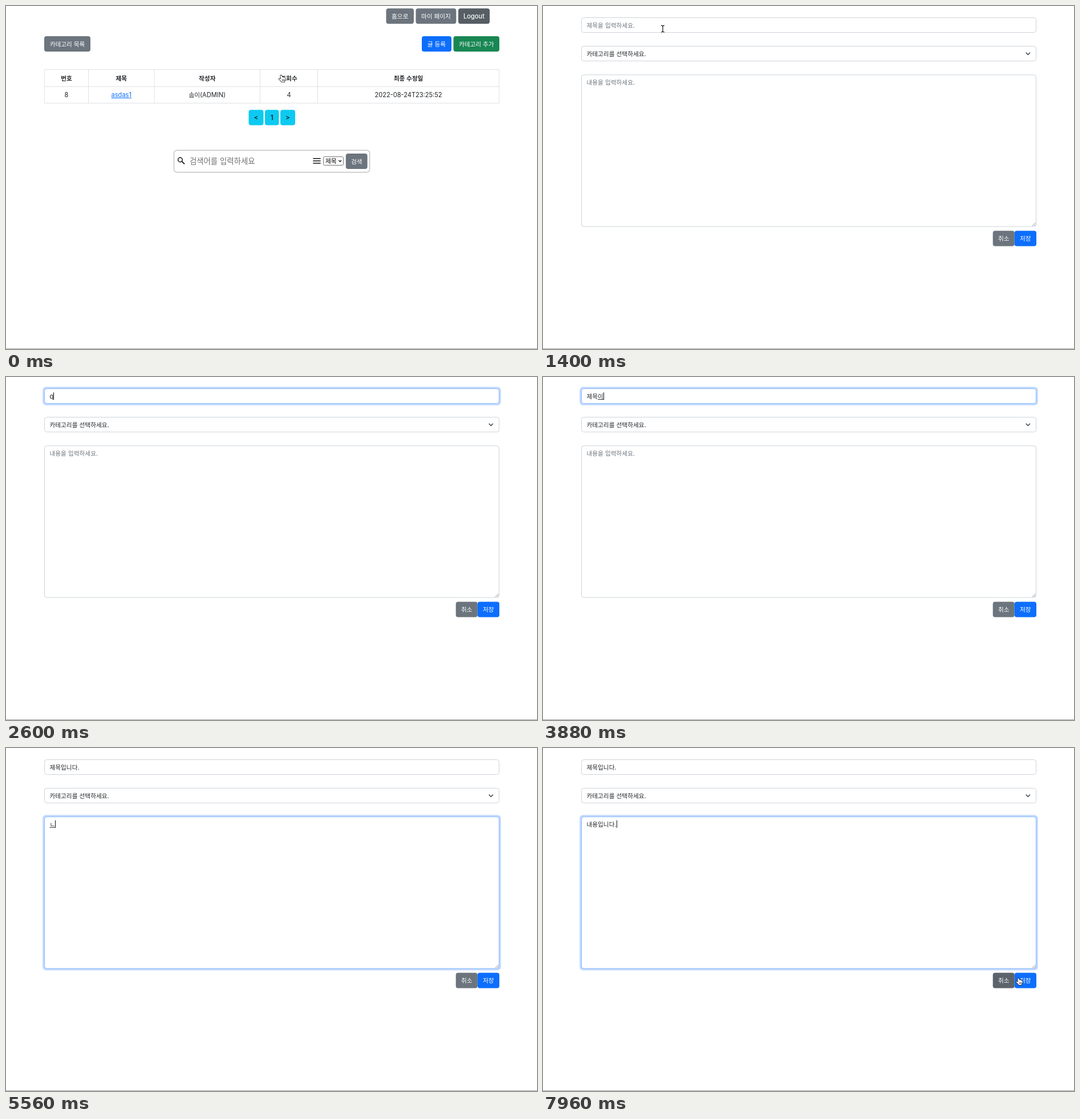
Write an HTML page with a canvas that moves like this. It is 931 px wide and 602 px high and loops after 8 s.

```html
<!DOCTYPE html>
<html lang="ko">
<head>
<meta charset="utf-8">
<title>게시판 글 등록</title>
<style>
html, body { margin: 0; width: 100%; height: 100%; overflow: hidden; background: #fff; }
canvas { display: block; }
</style>
</head>
<body>
<canvas id="stage" width="931" height="602"></canvas>
<script>
const ctx = document.getElementById('stage').getContext('2d');
const LOOP = 8000, STEP = 40;
const GRAY = '#6c757d', GRAY_DARK = '#5c636a', BLUE = '#0d6efd', INK = '#212529';
const FONT = 'Inter, "Noto Sans CJK KR", "Noto Sans CJK", sans-serif';
const HANGUL_FONT = '"Noto Sans CJK KR", "Noto Sans CJK", sans-serif';

// [time, x, y] of the pointer's hot spot
const PATH = [
  [0, 482.5, 122], [640, 757, 66.5], [880, 757, 66.5], [1400, 210, 40],
  [4720, 210, 40], [4960, 198, 162], [5120, 215, 200], [7160, 215, 200],
  [7560, 620, 400], [7760, 780, 426], [7960, 833.5, 404.5]
];

// [time, text, still composing]
const TITLE = [
  [0, ''], [2160, 'q'], [2280, ''], [2600, 'q'], [2720, ''],
  [3280, 'ㅈ', 1], [3360, '제', 1], [3440, '젬', 1], [3560, '제모', 1], [3640, '제목', 1],
  [3760, '제목ㅇ', 1], [3880, '제목이', 1], [4080, '제목입', 1], [4160, '제목입니', 1],
  [4240, '제목입니다', 1], [4440, '제목입니다.']
];
const BODY = [
  [0, ''], [5560, 'ㄴ', 1], [5760, '내', 1], [5960, '냉', 1], [6160, '내요', 1],
  [6240, '내용', 1], [6320, '내용ㅇ', 1], [6480, '내용이', 1], [6560, '내용입', 1],
  [6640, '내용입니', 1], [6720, '내용입니다', 1], [6800, '내용입니다.']
];

const clamp = v => Math.max(0, Math.min(1, v));
const ramp = (t, from, to) => clamp((t - from) / (to - from));
const smooth = p => p * p * (3 - 2 * p);
const within = (v, a, b) => v >= a && v < b;

function mix(a, b, p) {
  const part = (c, i) => parseInt(c.slice(1 + i * 2, 3 + i * 2), 16);
  return 'rgb(' + [0, 1, 2].map(i => Math.round(part(a, i) + (part(b, i) - part(a, i)) * p)) + ')';
}

function pointerAt(t) {
  for (let i = 1; i < PATH.length; i++) {
    const [t0, x0, y0] = PATH[i - 1], [t1, x1, y1] = PATH[i];
    if (t <= t1) {
      const p = smooth(ramp(t, t0, t1));
      return [x0 + (x1 - x0) * p, y0 + (y1 - y0) * p];
    }
  }
  return PATH[PATH.length - 1].slice(1);
}

function box(x, y, w, h, r, fill, stroke, width = 1) {
  ctx.beginPath();
  ctx.roundRect(x, y, w, h, r);
  if (fill) { ctx.fillStyle = fill; ctx.fill(); }
  if (stroke) { ctx.strokeStyle = stroke; ctx.lineWidth = width; ctx.stroke(); }
}

function line(points, color, width = 1) {
  ctx.beginPath();
  points.forEach(([x, y]) => ctx.lineTo(x, y));
  ctx.strokeStyle = color;
  ctx.lineWidth = width;
  ctx.stroke();
}

// Hangul and Latin runs get their own optical size
function layout(str, size, weight) {
  const runs = str.match(/[ㄱ-ㅎ가-힣]+|[^ㄱ-ㅎ가-힣]+/g) || [];
  let width = 0;
  const parts = runs.map(run => {
    const hangul = /[ㄱ-ㅎ가-힣]/.test(run);
    const font = `${weight} ${size * (hangul ? 0.935 : 0.97)}px ${hangul ? HANGUL_FONT : FONT}`;
    ctx.font = font;
    const part = { run, font, x: width };
    width += ctx.measureText(run).width;
    return part;
  });
  return { parts, width };
}

function text(str, x, cy, { size = 11.4, weight = 400, color = INK, align = 0 } = {}) {
  const { parts, width } = layout(str, size, weight);
  const left = x - width * align;
  ctx.fillStyle = color;
  for (const p of parts) {
    ctx.font = p.font;
    ctx.fillText(p.run, left + p.x, cy + size * 0.355);
  }
  return { left, width };
}

function button(label, x, y, w, fill, color = '#fff') {
  box(x, y, w, 27, 4, fill);
  text(label, x + w / 2, y + 13.5, { weight: 500, color, align: 0.5 });
}

function drawList(t) {
  button('홈으로', 666.5, 4.3, 48.5, GRAY);
  button('마이 페이지', 718.5, 4.3, 70.8, GRAY);
  button('Logout', 793, 4.3, 55, '#565e64');
  button('카테고리 목록', 67, 53, 81, GRAY);
  button('글 등록', 729, 53, 52, mix(BLUE, '#0b5ed7', ramp(t, 520, 680)));
  button('카테고리 추가', 784.5, 53, 80.5, '#198754');
  drawTable();
  [['<', 425.5, 26], ['1', 454, 24.5], ['>', 481, 26]]
    .forEach(([label, x, w]) => button(label, x, 182.3, w, '#0dcaf0', '#000'));
  drawSearch();
}

function drawTable() {
  const cols = [67.5, 144.5, 260, 445.5, 546.5, 864.5], rows = [111.5, 141.5, 170.5];
  rows.forEach(y => line([[cols[0], y], [cols[5], y]], '#dee2e6'));
  cols.forEach(x => line([[x, rows[0]], [x, rows[2]]], '#dee2e6'));
  const head = ['번호', '제목', '작성자', '조회수', '최종 수정일'];
  const cells = ['8', 'asdas1', '솜이(ADMIN)', '4', '2022-08-24T23:25:52'];
  head.forEach((label, i) => {
    const mid = (cols[i] + cols[i + 1]) / 2;
    text(label, mid, 126.7, { weight: 700, align: 0.5 });
    const link = i === 1;
    const { left, width } = text(cells[i], mid, 156, { align: 0.5, color: link ? BLUE : INK });
    if (link) line([[left, 161.5], [left + width, 161.5]], BLUE);
  });
}

function drawSearch() {
  box(294.5, 253.2, 343.2, 38.6, 5, '#fff', '#c3c3c3', 1.4);
  ctx.beginPath();
  ctx.arc(305.4, 269.9, 3.8, 0, 7);
  ctx.strokeStyle = '#111';
  ctx.lineWidth = 1.5;
  ctx.stroke();
  line([[308.2, 272.7], [313, 277.3]], '#111', 1.8);
  text('검색어를 입력하세요', 322, 271.5, { size: 14.3, color: '#6f6f6f' });
  [267.7, 271.8, 275.9].forEach(y => line([[538.3, y], [551.7, y]], '#111', 1.5));
  box(556.5, 264.5, 35, 15, 2, '#fff', '#767676');
  text('제목', 560, 272, { color: '#000' });
  line([[583.4, 270.8], [585.7, 273.2], [588, 270.8]], '#111', 1.3);
  button('검색', 595.8, 259, 37.8, GRAY);
}

function field(y, h, glow) {
  if (glow > 0) box(64.2, y - 2.8, 803.6, h + 5.6, 6, `rgba(13,110,253,${0.25 * glow})`);
  box(67.5, y + 0.5, 797, h - 1, 4, '#fff', mix('#ced4da', '#86b7fe', glow));
}

function entry(t, states, cy, hint, from, to) {
  const [since, str, composing] = states.filter(s => s[0] <= t).pop();
  if (str) text(str, 76.5, cy);
  else text(hint, 76.5, cy, { color: GRAY });
  const end = 76.5 + layout(str, 11.4, 400).width;
  if (composing) {
    const start = 76.5 + layout(str.slice(0, -1), 11.4, 400).width;
    line([[start, cy + 5.8], [end, cy + 5.8]], INK);
  }
  const idle = t - Math.max(since, from);
  if (within(t, from, to) && idle % 1000 < 500) {
    ctx.fillStyle = '#111';
    ctx.fillRect(Math.round(end), cy - 6.5, 1, 13);
  }
}

function drawEditor(t) {
  const moved = ramp(t, 5080, 5240);
  ctx.save();
  ctx.translate(1.6 * Math.sin(Math.PI * ramp(t, 4800, 5120)), 0);
  field(20, 27, ramp(t, 1480, 1600) * (1 - moved));
  entry(t, TITLE, 33.5, '제목을 입력하세요.', 1480, 5080);
  field(70, 27, 0);
  text('카테고리를 선택하세요.', 76.5, 83.7);
  line([[846.7, 81.8], [850.3, 85.4], [853.9, 81.8]], '#343a40', 1.4);
  field(120.3, 267.2, moved);
  entry(t, BODY, 133.5, '내용을 입력하세요.', 5080, LOOP);
  line([[858, 386], [863.5, 380.5]], '#777', 0.8);
  line([[861.2, 386], [863.5, 383.7]], '#777', 0.8);
  button('취소', 788.7, 394.6, 38, mix(GRAY, GRAY_DARK, ramp(t, 7800, 7920)));
  button('저장', 826.7, 394.6, 38.3, BLUE);
  ctx.restore();
}

function outline(points, fill, stroke, width) {
  ctx.beginPath();
  points.forEach(([x, y]) => ctx.lineTo(x, y));
  ctx.closePath();
  ctx.lineJoin = 'round';
  ctx.strokeStyle = stroke;
  ctx.lineWidth = width;
  ctx.stroke();
  ctx.fillStyle = fill;
  ctx.fill();
  ctx.lineJoin = 'miter';
}

const shapes = {
  beam() {
    for (const [color, width] of [['#fff', 2.4], ['#111', 1.2]]) {
      line([[0, -5], [0, 5]], color, width);
      line([[-2.8, -5.8], [-1.2, -5.6], [0, -4.6], [1.2, -5.6], [2.8, -5.8]], color, width);
      line([[-2.8, 5.8], [-1.2, 5.6], [0, 4.6], [1.2, 5.6], [2.8, 5.8]], color, width);
    }
  },
  arrow() {
    outline([[0, 0], [0, 11.5], [2.6, 9.2], [4.4, 13.2], [6.2, 12.4], [4.5, 8.5], [8, 8.3]],
      '#000', '#fff', 1.8);
  },
  hand() {
    outline([[-1.4, 0.2], [-0.2, -0.6], [1, 0.4], [2, 3], [3.4, 2.6], [4.6, 3.4], [5.8, 3.4],
      [7, 4.6], [7, 7.4], [6, 9.6], [5.6, 11.2], [0.4, 11.2], [-1.2, 8.8], [-3.8, 6.4],
      [-3.6, 5.2], [-2.2, 5.2], [-0.4, 6.4]], '#fff', '#111', 1.5);
    [1.6, 3.3, 5].forEach(x => line([[x, 6.8], [x + 0.2, 9.4]], '#111', 0.8));
  }
};

function shapeFor(t, x, y) {
  if (t < 880) {
    const onButton = within(x, 729, 781) && within(y, 53, 80);
    return t < 80 || onButton ? 'hand' : 'arrow';
  }
  if (within(x, 67, 865) && (within(y, 20, 47) || within(y, 120, 387))) return 'beam';
  return within(x, 789, 865) && within(y, 395, 422) ? 'hand' : 'arrow';
}

function drawPointer(t) {
  if (within(t, 2160, 4720) || within(t, 5560, 7160)) return;
  const [x, y] = pointerAt(t);
  ctx.save();
  ctx.translate(x, y);
  if (within(t, 720, 880) || within(t, 1440, 1560) || within(t, 5080, 5200)) {
    for (const [color, width] of [['#fff', 4.6], ['#000', 2.2]]) {
      ctx.beginPath();
      ctx.arc(0, 0, 20.4, 0, 7);
      ctx.strokeStyle = color;
      ctx.lineWidth = width;
      ctx.stroke();
    }
  }
  shapes[shapeFor(t, x, y)]();
  ctx.restore();
}

const start = performance.now();

function draw() {
  const t = Math.floor(((performance.now() - start) % LOOP) / STEP) * STEP;
  ctx.fillStyle = '#fff';
  ctx.fillRect(0, 0, 931, 602);
  if (t < 880) drawList(t);
  else drawEditor(t);
  ctx.fillStyle = '#a3a3a3';
  ctx.fillRect(0, 601, 931, 1);
  drawPointer(t);
  requestAnimationFrame(draw);
}
draw();
</script>
</body>
</html>
```
